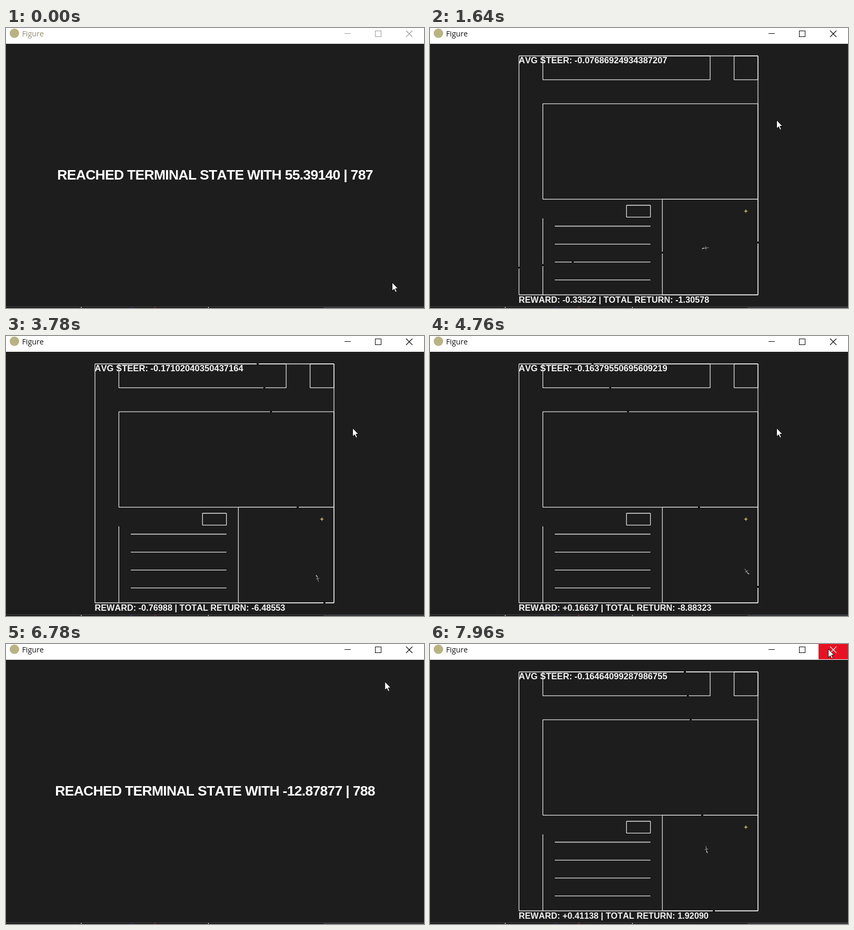
These frames come from a looping animation (794 by 532 pixels, 8 s). An HTML page with a canvas:

```html
<!DOCTYPE html>
<html lang="en">
<head>
<meta charset="utf-8">
<title>Figure</title>
<style>
  html, body { margin: 0; width: 100%; height: 100%; overflow: hidden; background: #1d1d1d; }
  canvas { display: block; width: 794px; height: 532px; }
</style>
</head>
<body>
<canvas id="stage" width="794" height="532"></canvas>
<script>
const screen2d = document.getElementById('stage').getContext('2d');
const layer = document.createElement('canvas');
layer.width = 804;
layer.height = 542;
const layer2d = layer.getContext('2d');
let ctx = screen2d;

const UI = '"Open Sans", "Noto Sans", sans-serif';
const BOLD = '"Liberation Sans", Arial, sans-serif';

// The picture updates in ticks; an episode closes, reopens, runs and ends.
const LOOP = 8000, TICK = 70, LAST_TICK = 113;
const FIRST_CLOSE = 16, EPISODE = 87;
const OPENING = 3, CRASH = 71, END_SCREEN = 75;

// tick in episode, x, y, heading in degrees, total return, reward, average steer
const START = [OPENING, 531.8, 416.3, 0, -0.00953, -0.00953, -0.5667636394500732];
const RUNS = [
  [
    START,
    [7, 524, 418, 174, -1.30578, -0.33522, -0.07686924934387207],
    [21, 548, 413, 371.9, 2.71461, 0.02991, -0.24135148525238037],
    [38, 592, 461, 614.4, -6.48553, -0.76988, -0.17102040350437164],
    [67, 616, 456, 943.8, -9.64976, -0.56817, -0.2296082228422165]
  ],
  [START, [10, 525, 390, 83.1, 1.9209, 0.41138, -0.16464099287986755]]
];

// walls in map units, ten to a side
const rect = (l, t, r, b) => [[l, t, r, t], [r, t, r, b], [r, b, l, b], [l, b, l, t]];
const WALLS = [
  ...rect(0, 0, 10, 10), ...rect(1, 0, 8, 1), ...rect(9, 0, 10, 1),
  ...rect(1, 2, 10, 6), ...rect(6, 6, 10, 10), ...rect(4.5, 6.25, 5.5, 6.75),
  [1, 6.8, 1, 10],
  ...[0, 1, 2, 3].map(i => [1.5, 7.125 + i * 0.75, 5.5, 7.125 + i * 0.75])
].map(w => w.map((v, i) => v * 45.4 + (i % 2 ? 53 : 169)));

const CLOSE = [756.5, 9.5], REST = [658.5, 175];
const MOVES = [
  { from: 0, to: 2, end: [693, 252] },
  { from: 4, to: 13, end: CLOSE },
  { from: 16, to: 20, end: REST },
  { from: 92, to: 100, end: CLOSE }
];

const lerp = (a, b, u) => a * (1 - u) + b * u;
const clamp = u => Math.max(0, Math.min(1, u));

function pointerAt(n) {
  let pos = [733.5, 483.5];
  for (const { from, to, end } of MOVES) {
    const u = clamp((n - from) / (to - from));
    pos = pos.map((v, i) => lerp(v, end[i], u));
  }
  return pos;
}

function carAt(keys, k) {
  let i = 0;
  while (i < keys.length - 2 && keys[i + 1][0] <= k) i++;
  const a = keys[i], b = keys[i + 1];
  const len = b[0] - a[0], u = (k - a[0]) / len;
  const arch = 4 * u * (1 - u);
  const dx = b[1] - a[1], dy = b[2] - a[2];
  const bulge = arch * len * 0.4 / Math.hypot(dx, dy);
  // Hermite curve for the total; its slope is the reward
  const p = a[4], q = b[4], s = a[5] * len, e = b[5] * len;
  const c2 = 3 * (q - p) - 2 * s - e, c3 = 2 * (p - q) + s + e;
  return {
    x: lerp(a[1], b[1], u) + dy * bulge,
    y: lerp(a[2], b[2], u) - dx * bulge,
    angle: lerp(a[3], b[3], u) * Math.PI / 180,
    total: p + u * (s + u * (c2 + u * c3)),
    reward: (s + u * (2 * c2 + 3 * u * c3)) / len,
    steer: lerp(a[6], b[6], u) + 0.07 * Math.sin(k * 7.3) * arch
  };
}

function text(str, x, y, font, color, align = 'left', spacing = 0) {
  ctx.font = font;
  ctx.fillStyle = color;
  ctx.textAlign = align;
  ctx.letterSpacing = spacing + 'px';
  ctx.fillText(str, x, y);
}

function path(pts, color, width) {
  ctx.beginPath();
  for (let i = 0; i < pts.length; i += 2) ctx.lineTo(pts[i], pts[i + 1]);
  ctx.strokeStyle = color;
  ctx.lineWidth = width;
  ctx.stroke();
}

function plus(x, y, r, color) {
  path([x - r, y, x + r, y], color, 1.2);
  path([x, y - r, x, y + r], color, 1.2);
}

function box(x, y, w, h, color) {
  ctx.fillStyle = color;
  ctx.fillRect(x, y, w, h);
}

function dot(x, y, r, color) {
  ctx.fillStyle = color;
  ctx.beginPath();
  ctx.arc(x, y, r, 0, 7);
  ctx.fill();
}

function drawChat() {
  const message = (str, right, y) => text(str, right, y, '18px ' + UI, '#f0f0f0', 'right');
  const stamp = (time, right, y) =>
    text('Today at ' + time, right, y, '13.3px ' + UI, '#a8abb0', 'right');
  box(0, 0, 794, 532, '#34363c');
  box(0, 0, 794, 56, '#3e3a33');
  stamp('11:50 PM', 92, 19);
  message("so rn tho. It won't be like super physically accurate, but good enough for now", 637, 46);
  stamp('11:52 PM', 94, 100);
  path([0, 148.5, 794, 148.5], '#e04045', 1);
  stamp('11:53 PM', 92, 181);
  message('was on its way, but then started doing the spinny', 400, 209);
  ctx.fillStyle = '#1a1a1a';
  ctx.beginPath();
  ctx.roundRect(-10, 220, 613, 330, 8);
  ctx.fill();
  path([143, 532, 143, 240, 384.5, 240, 384.5, 532], '#e8e8e8', 1.2);
  text('AVG STEER: -0.6029955744743347', 144, 251.5, 'bold 14.3px ' + BOLD, '#e8e8e8');
  plus(384, 393, 4, '#999');
  path([236, 532, 249, 526], '#2a2a90', 1);
  path([281, 532, 287, 528], '#c03030', 1);
}

// black dots wherever the line through the car meets a wall
function drawCrossings(car) {
  const nx = -Math.sin(car.angle), ny = Math.cos(car.angle);
  const side = (x, y) => (x - car.x) * nx + (y - car.y) * ny;
  for (const [x0, y0, x1, y1] of WALLS) {
    const d = side(x0, y0), e = side(x1, y1);
    if (d * e > 0 || d === e) continue;
    const u = d / (d - e);
    dot(lerp(x0, x1, u), lerp(y0, y1, u), 1.8, '#000');
  }
}

function drawCar(car) {
  ctx.save();
  ctx.translate(car.x, car.y);
  ctx.rotate(car.angle);
  path([-6, 0, 4, 0], '#a0a0a0', 1);
  path([0, -3.2, 0, 3.2], '#a0a0a0', 1);
  ctx.translate(4, 0);
  ctx.rotate(car.steer * 2);
  path([-1, 0, 3.5, 0], '#e4e4e4', 1.2);
  ctx.restore();
}

function drawMap(car) {
  for (const w of WALLS) path(w, '#e6e6e6', 1.3);
  drawCrossings(car);
  plus(600, 348, 3.2, '#f0d878');
  drawCar(car);
  const sign = car.reward < 0 ? '' : '+';
  text('AVG STEER: ' + car.steer, 168.5, 66.5, 'bold 16.6px ' + BOLD, '#f4f4f4');
  text(`REWARD: ${sign}${car.reward.toFixed(5)} | TOTAL RETURN: ${car.total.toFixed(5)}`,
    168.5, 521.5, 'bold 16.3px ' + BOLD, '#f4f4f4');
}

function drawEnd(total, count) {
  text(`REACHED TERMINAL STATE WITH ${total.toFixed(5)} | ${count}`,
    397, 288.3, 'bold 26.5px ' + BOLD, '#fff', 'center', -0.7);
}

function drawFrame(active, hoverColor) {
  const ink = active ? '#000' : '#999';
  box(-4, -6, 800, 536, '#1d1d1d');
  path([-3.5, -6, -3.5, 529.5, 795.5, 529.5, 795.5, -6], '#444', 1);
  box(-4, -6, 800, 36, '#fff');
  if (hoverColor) box(738, -6, 58, 35, hoverColor);
  dot(16, 10, 9, '#b9b284');
  text('Figure', 30.5, 16, '14.2px ' + UI, active ? '#111' : '#8f8b73');
  path([643, 10.5, 655, 10.5], ink, 1);
  ctx.strokeRect(701.5, 5.5, 11, 11);
  const cross = hoverColor ? '#fff' : ink;
  path([760, 5, 772, 17], cross, 1.1);
  path([772, 5, 760, 17], cross, 1.1);
}

function drawPointer(x, y) {
  ctx.save();
  ctx.translate(x, y);
  ctx.beginPath();
  for (const [px, py] of [[0, 0], [0, 16], [3.7, 12.6], [6.4, 18.4], [8.8, 17.3], [6.2, 11.6], [11, 11.4]])
    ctx.lineTo(px, py);
  ctx.closePath();
  ctx.fillStyle = '#fff';
  ctx.fill();
  ctx.strokeStyle = '#000';
  ctx.lineWidth = 0.9;
  ctx.stroke();
  ctx.restore();
}

// the window is painted on its own layer so that it fades as a whole
function drawWindow(paint, alpha, scale, x, y) {
  ctx = layer2d;
  ctx.setTransform(1, 0, 0, 1, 0, 0);
  ctx.clearRect(0, 0, layer.width, layer.height);
  ctx.translate(4, 6);
  ctx.fontKerning = 'none';
  paint();
  ctx = screen2d;
  ctx.save();
  ctx.globalAlpha = alpha;
  ctx.translate(x, y);
  ctx.scale(scale, scale);
  ctx.drawImage(layer, -4, -6);
  ctx.restore();
}

function draw(t) {
  const n = Math.min(LAST_TICK, Math.floor((t + 10) / TICK));
  const run = Math.floor((n - FIRST_CLOSE) / EPISODE);
  const k = n - FIRST_CLOSE - run * EPISODE;
  const [x, y] = pointerAt(n);
  const opening = k === OPENING && run >= 0;
  const hover = x >= 738 && y < 30 && (opening ? '#ee7a80' : '#e81123');

  const paint = () => {
    drawFrame(run >= 0, hover);
    if (run < 0 || (run === 0 && k === 0)) drawEnd(55.3914, 787);
    else if (k === 0 || k >= END_SCREEN) drawEnd(carAt(RUNS[0], CRASH).total, 788);
    else drawMap(carAt(RUNS[run], Math.min(k, CRASH)));
  };

  drawChat();
  if (run < 0 || k > OPENING) drawWindow(paint, 1, 1, 0, 0);
  else if (opening) drawWindow(paint, 0.55, 0.976, 7, 4.2);
  else if (k === 0) drawWindow(paint, 0.55, 0.95, 20, 13);
  drawPointer(x, y);
}

screen2d.fontKerning = 'none';
const began = performance.now();
function tick() {
  draw((performance.now() - began) % LOOP);
  requestAnimationFrame(tick);
}
tick();
</script>
</body>
</html>
```
